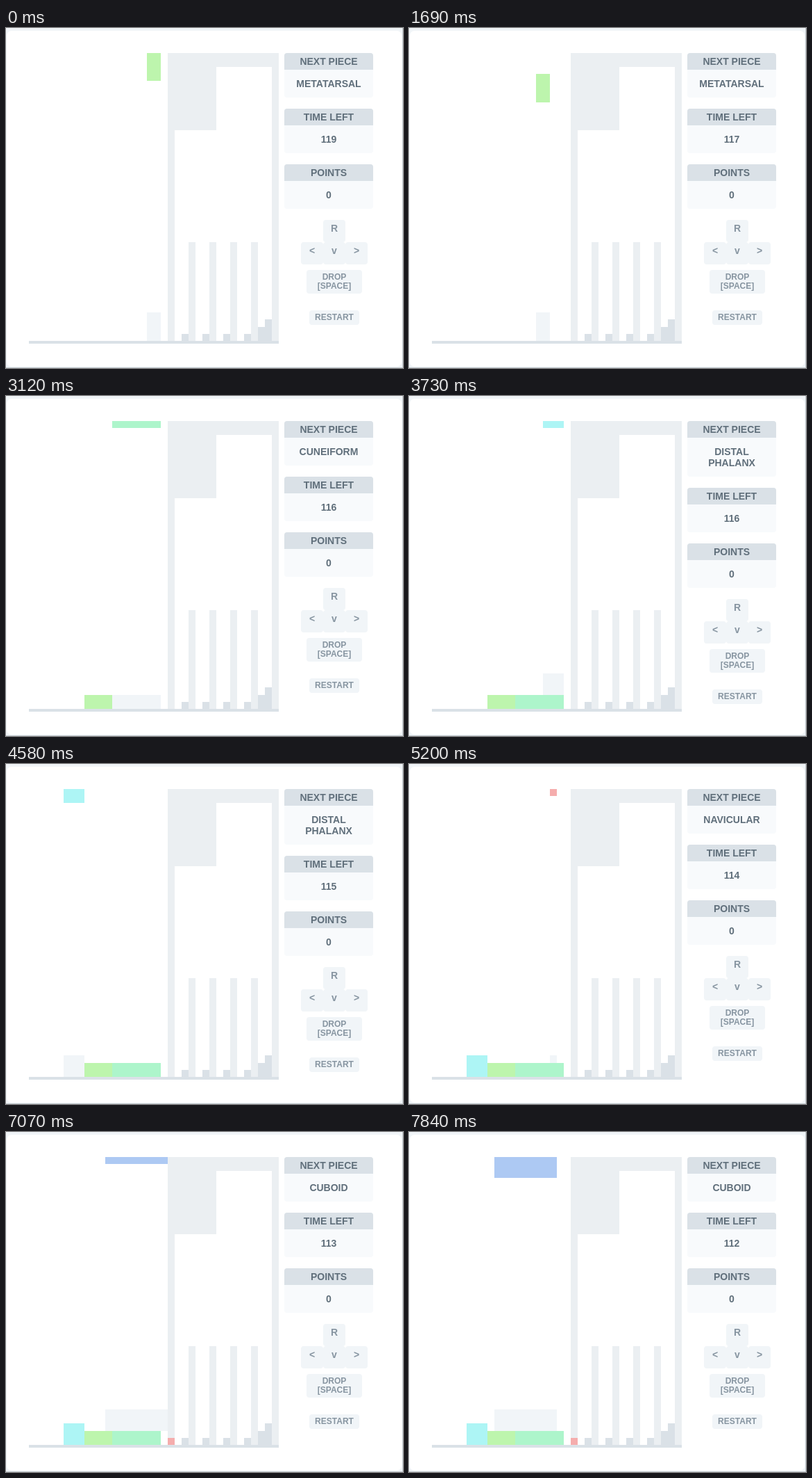
Write an HTML page with a canvas that moves like this. It is 572 px wide and 489 px high and loops after 8 s.

```html
<!DOCTYPE html>
<html lang="en">
<head>
<meta charset="utf-8">
<title>Falling bones</title>
<style>
  * { box-sizing: border-box; }
  html, body { margin: 0; width: 100%; height: 100%; overflow: hidden; }
  body {
    position: relative;
    background: #f1f5f8;
    font: bold 14px/16px "Liberation Sans", Arial, sans-serif;
    color: #606f7b;
    text-align: center;
  }
  .edge { position: absolute; inset: 0; border: solid #c6ccd1; border-width: 0 1px 1px 0; }
  .card { position: absolute; left: 1px; top: 4px; width: 569px; height: 483px; border-radius: 7px; background: #fff; }
  canvas { position: absolute; left: 0; top: 0; }
  .side { position: absolute; left: 401px; top: 36px; width: 128px; }
  .panel { margin-bottom: 16px; border-radius: 4px; overflow: hidden; background: #f8fafc; }
  .title { padding: 4px 0; background: #dae1e7; }
  .value { padding: 12px 16px; }
  .keys { position: relative; color: #8795a1; }
  .key { position: absolute; border-radius: 4px; background: #f1f5f8; }
  .arrow { width: 32px; height: 32px; padding-top: 4px; }
  .small { font-size: 12px; line-height: 13px; padding-top: 4px; }
</style>
</head>
<body>
<div class="edge"></div>
<div class="card"></div>
<canvas id="board" width="572" height="489"></canvas>
<div class="side">
  <div class="panel"><div class="title">NEXT PIECE</div><div class="value" id="next"></div></div>
  <div class="panel"><div class="title">TIME LEFT</div><div class="value" id="time"></div></div>
  <div class="panel"><div class="title">POINTS</div><div class="value">0</div></div>
  <div class="keys">
    <div class="key arrow" style="left:56px;top:0">R</div>
    <div class="key arrow" style="left:24px;top:32px">&lt;</div>
    <div class="key arrow" style="left:56px;top:32px">v</div>
    <div class="key arrow" style="left:88px;top:32px">&gt;</div>
    <div class="key small" style="left:32px;top:72px;width:80px;height:34px">DROP<br>[SPACE]</div>
    <div class="key small" style="left:36px;top:130px;width:72px;height:21px">RESTART</div>
  </div>
</div>
<script>
const LOOP = 8000, COLS = 36, ROWS = 41;
const SHADE = '#ebeff2', GROUND = '#dae1e7', GHOST = '#f1f5f8';
const ctx = document.getElementById('board').getContext('2d');
const nextLabel = document.getElementById('next');
const timeLabel = document.getElementById('time');

const bone = (name, w, h, col, color) => ({ name, w, h, col, row: 1 - h, color });
const bones = [
  bone('PHALANX', 2, 4, 17, '#bdf5ad'),
  bone('METATARSAL', 7, 2, 13, '#adf5cb'),
  bone('CUNEIFORM', 3, 3, 16, '#adf5f5'),
  bone('DISTAL PHALANX', 1, 1, 17, '#f5adad'),
  bone('NAVICULAR', 9, 3, 11, '#adc9f3'),
  bone('CUBOID', 3, 3, 16, '#f5e3ad')
];

// l/r: move, d: one row down, o: rotate, h: hard drop, t: clock tick
const moves = `460 dt,990 d,1450 d,1570 lt,1690 l,1860 l,1970 ld,2120 l,2260 l,2410 o,2480 l,
2650 d,2720 lt,2870 h,3040 l,3200 d,
3730 h,3810 l,3890 lt,4010 ll,4130 ll,4260 lld,4380 ll,4500 l,4730 ld,
5050 td,5120 r,5200 h,5290 l,5410 l,5560 r,5720 d,5850 r,5980 r,
6150 t,6260 d,6390 r,6530 r,6760 d,6850 d,6960 d,7070 h,
7300 dt,7480 l,7660 l,7840 d`.split(',').map(s => {
  const [at, keys] = s.trim().split(' ');
  return { at: +at, keys };
});

function landing(p, heights) {
  return ROWS - p.h - Math.max(...heights.slice(p.col, p.col + p.w));
}

function stateAt(t) {
  const heights = Array(COLS).fill(0), settled = [];
  let index = 0, time = 119, piece = { ...bones[0], row: 0 };
  const act = {
    l() { piece.col--; },
    r() { piece.col++; },
    d() { piece.row++; },
    t() { time--; },
    o() {
      const shift = (piece.h - piece.w) / 2;
      piece.col -= shift;
      piece.row += shift;
      [piece.w, piece.h] = [piece.h, piece.w];
    },
    h() {
      piece.row = landing(piece, heights);
      heights.fill(ROWS - piece.row, piece.col, piece.col + piece.w);
      settled.push(piece);
      piece = { ...bones[++index] };
    }
  };
  for (const m of moves) {
    if (m.at > t) break;
    for (const k of m.keys) act[k]();
  }
  const ghost = { ...piece, row: landing(piece, heights), color: GHOST };
  return { settled, piece, ghost, time, next: bones[index + 1].name };
}

const rowY = r => Math.round(36 + Math.max(r, 0) * 10.09);

function block(col, row, w, h, color) {
  const y = rowY(row);
  ctx.fillStyle = color;
  ctx.fillRect(33 + col * 10, y, w * 10, rowY(row + h) - y);
}

function drawFoot() {
  block(20, 0, 16, 2, SHADE);
  block(20, 0, 7, 11, SHADE);
  block(20, 0, 1, ROWS, SHADE);
  block(35, 0, 1, ROWS, SHADE);
  for (let i = 0; i < 4; i++) {
    block(23 + 3 * i, 27, 1, 14, SHADE);
    block(22 + 3 * i, 40, 1, 1, GROUND);
  }
  block(33, 39, 1, 2, GROUND);
  block(34, 38, 1, 3, GROUND);
  ctx.fillStyle = GROUND;
  ctx.fillRect(33, 450, 360, 4);
}

const start = performance.now();

function frame(now) {
  const s = stateAt(Math.max(0, now - start) % LOOP);
  ctx.clearRect(0, 0, 572, 489);
  drawFoot();
  for (const p of [s.ghost, ...s.settled, s.piece]) block(p.col, p.row, p.w, p.h, p.color);
  nextLabel.textContent = s.next;
  timeLabel.textContent = s.time;
  requestAnimationFrame(frame);
}
frame(start);
</script>
</body>
</html>
```
